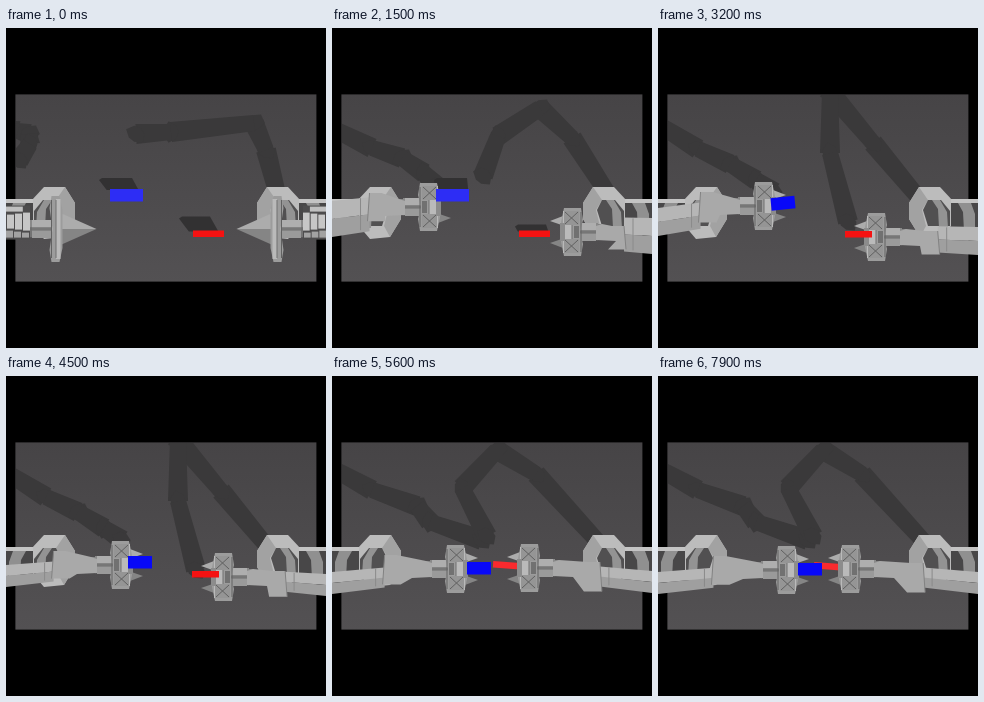
Write an HTML page with a canvas that moves like this. It is 320 px wide and 320 px high and loops after 8000 ms.

```html
<!DOCTYPE html>
<html lang="en">
<head>
<meta charset="utf-8">
<title>Two robot arms joining blocks</title>
<style>
html, body { margin: 0; width: 100%; height: 100%; overflow: hidden; background: #000; }
canvas { display: block; width: 100vw; height: 100vh; }
</style>
</head>
<body>
<canvas id="stage" width="320" height="320"></canvas>
<script>
const g = document.getElementById('stage').getContext('2d');
const LOOP = 8000, STEP = 100;
const SHADE = '#3a393a';

// The task as key points. Grippers are [x, y, forearm y], with x measured
// inwards from the arm's own side of the stage.
const HANDS = [
  { at: 0, left: [50, 201, 193], right: [49, 201, 193] },
  { at: 1500, left: [97, 179, 191], right: [80, 204, 208] },
  { at: 3200, left: [106, 178, 194], right: [102, 209, 213] },
  { at: 4500, left: [115, 189, 200], right: [103, 201, 209] },
  { at: 5600, left: [124, 193, 207], right: [123, 192, 206] },
  { at: 6800, left: [129, 194, 207], right: [128, 193, 207] }
];
// Joints of the cast shadows, shoulder to fingertip, as x, y pairs.
const REST = {
  left: [0, 100, 12, 103, 23, 106, 24, 116, 13, 132],
  right: [275, 180, 260, 122, 248, 95, 165, 104, 130, 106]
};
const REACH = {
  left: [0, 100, 40, 120, 70, 130, 92, 145, 105, 158],
  right: [285, 180, 240, 110, 208, 80, 166, 108, 151, 148]
};
const GRASP = {
  left: [0, 96, 40, 121, 72, 136, 98, 152, 116, 164],
  right: [265, 175, 215, 115, 172, 64, 172, 125, 190, 194]
};
const MEET = {
  left: [0, 92, 40, 114, 85, 130, 98, 146, 150, 164],
  right: [270, 170, 204, 98, 165, 74, 130, 112, 155, 160]
};
const SHADOWS = [
  { at: 0, ...REST }, { at: 1500, ...REACH }, { at: 3000, ...GRASP },
  { at: 4500, ...GRASP }, { at: 5600, ...MEET }
];

const ramp = (t, a, b) => Math.min(1, Math.max(0, (t - a) / (b - a)));
const mix = (a, b, k) => a + (b - a) * k;

function pose(keys, side, t) {
  let i = 0;
  while (i < keys.length - 2 && t >= keys[i + 1].at) i++;
  const a = keys[i], b = keys[i + 1];
  const k = ramp(t, a.at, b.at) ** 0.8;
  return a[side].map((v, n) => mix(v, b[side][n], k));
}

function poly(color, ...p) {
  g.beginPath();
  for (let i = 0; i < p.length; i += 2) g.lineTo(p[i], p[i + 1]);
  g.closePath();
  g.fillStyle = color;
  g.fill();
}

function box(color, x0, y0, x1, y1) {
  g.fillStyle = color;
  g.fillRect(x0, y0, x1 - x0, y1 - y0);
}

function line(color, x0, y0, x1, y1) {
  g.beginPath();
  g.moveTo(x0, y0);
  g.lineTo(x1, y1);
  g.strokeStyle = color;
  g.lineWidth = 1;
  g.stroke();
}

function armShadow(p) {
  g.strokeStyle = SHADE;
  g.lineJoin = 'bevel';
  for (let i = 0; i < p.length - 2; i += 2) {
    const [x0, y0, x1, y1] = p.slice(i, i + 4);
    const d = Math.hypot(x1 - x0, y1 - y0) || 1;
    const nx = (y0 - y1) / d, ny = (x1 - x0) / d;
    poly(SHADE, x0 + nx * 8, y0 + ny * 8, x1 + nx * 10, y1 + ny * 10,
      x1 - nx * 10, y1 - ny * 10, x0 - nx * 8, y0 - ny * 8);
    // angular joint
    const corners = [];
    for (let a = 0; a < 7; a++) {
      const r = 9 + 2 * Math.sin(a * 2 + i);
      corners.push(x1 + r * Math.cos(a * 0.9), y1 + r * Math.sin(a * 0.9));
    }
    poly(SHADE, ...corners);
  }
}

function blockShadow({ x, y, w, h }, dx, dy) {
  if (dy > -0.5) return;
  poly('#323132', x + dx, y + dy + 2, x + dx + 3, y + dy, x + w + dx, y + dy,
    x + w + dx * 0.4, y + 1, x + dx * 0.3, y + 1);
}

function block({ x, y, w, h, tilt }, color) {
  g.save();
  g.translate(x + w / 2, y + h / 2);
  g.rotate(tilt * Math.PI / 180);
  box(color, -w / 2, -h / 2, w / 2, h / 2);
  g.restore();
}

function mount() {
  poly('#bcbcbc', 38, 159, 59, 159, 69, 175, 69, 191, 58, 209, 38, 211, 27, 198, 25, 173);
  poly('#a2a2a2', 59, 159, 69, 175, 69, 191, 58, 209, 52, 198, 56, 182, 50, 172);
  poly('#515051', 28, 198, 28, 183, 37, 172, 50, 172, 55, 182, 50, 198);
  poly('#939393', 38, 172, 46, 172, 40, 181, 39, 200, 30, 200, 31, 184);
  box('#484748', 0, 175, 27, 202);
  poly('#909090', 7, 175, 20, 175, 15, 184, 14, 203, 3, 203, 3, 186);
  box('#c4c4c4', 0, 171, 27, 175);
}

function wrist(x0, x1, y) {
  box('#838383', x0, y - 8, x1, y + 8);
  box('#aeaeae', x0 + 4, y - 9, x1, y - 2);
  box('#9a9a9a', x0 + 6, y + 2, x1, y + 9);
  line('#646464', x0 + 5, y - 9, x0 + 5, y + 9);
  line('#6a6a6a', x0, y, x1, y);
}

// bend is the side on which the elbow bulges: -1 up, 1 down
function forearm(ex, y, ey, half, bend) {
  const kx = ex * 0.56, ky = mix(y, ey, 0.4);
  poly('#b6b6b6', 0, y - half, kx, ky - half + 1, kx, ky, 0, y);
  poly('#9f9f9f', 0, y, kx, ky, kx, ky + half - 1, 0, y + half);
  const top = bend < 0 ? ey - 14 : ey - 6, low = bend < 0 ? ky + 7 : ky + 15;
  poly('#a9a9a9', kx, top, kx + 12, top, ex, ey - 8, ex + 6, ey - 6,
    ex + 6, ey + 8, ex - 14, ey + 9, kx + 16, low, kx - 2, low);
  line('#828282', kx, top, kx - 2, low);
  line('#8a8a8a', kx - 9, ky - half + 2, kx - 9, ky + half - 2);
}

// boxy joints that show while the arm is folded
function joints(ex, y) {
  box('#4d4c4d', 0, y - 17, ex, y + 17);
  for (let i = 0; i < 3; i++) {
    const x = i * ex / 3;
    box('#c6c6c6', x + 1, y - 8 - i, x + ex / 3, y + 6 + i);
    box('#a2a2a2', x, y + 8 + i, x + ex / 3 - 1, y + 15);
  }
  box('#c0c0c0', 0, y - 16, ex * 0.7, y - 11);
}

function gripper(x, y, folded) {
  const w = mix(11, 6.5, folded), h = mix(24, 33, folded);
  const x0 = x - w, x1 = x + w, top = y - h, low = y + h;

  const reach = x1 + mix(11, 34, folded), gap = 11 * (1 - folded);
  poly('#acacac', x1 - 2, y - 16, x1 - 2, y - gap * 0.6, reach, y - gap);
  poly('#858585', x1 - 2, y + 16, x1 - 2, y + gap * 0.6, reach, y + gap);

  poly('#9c9c9c', x0 + 2, top, x1 - 3, top, x1, top + 14, x1, low - 14, x1 - 3, low,
    x0 + 2, low, x0, low - 12, x0 + 3, y, x0, top + 12);
  box('#bababa', x, top + 3, x1 - 2, low - 3);
  line('#626262', x0 + 2, top + 4, x0 + 2, low - 4);
  line('#707070', x, top + 4, x, low - 4);
  if (folded) return;
  for (const cy of [top + 10, low - 10]) {
    box('#959595', x0 + 4, cy - 7, x1 - 3, cy + 7);
    line('#606060', x0 + 5, cy - 6, x1 - 4, cy + 6);
    line('#606060', x0 + 5, cy + 6, x1 - 4, cy - 6);
  }
  box('#717171', x0 + 4, y - 6, x0 + 9, y + 6);
  box('#8c8c8c', x1 - 4, y - 9, x1 + 1, y + 9);
}

function arm([x, y, base], t, bend) {
  const folded = 1 - ramp(t, 0, 1500);
  const ex = x - 30;
  mount();
  wrist(ex, x - 4, y);
  if (folded > 0.3) joints(ex + 4, mix(base, y, 0.2));
  else forearm(ex, base, y, mix(18, 11, ramp(t, 1500, 4500)), bend);
  gripper(x, y, folded);
}

function mirrored(draw) {
  g.save();
  g.translate(320, 0);
  g.scale(-1, 1);
  draw();
  g.restore();
}

const floor = g.createLinearGradient(0, 66, 0, 254);
floor.addColorStop(0, '#464446');
floor.addColorStop(1, '#535153');

function render(t) {
  const left = pose(HANDS, 'left', t), right = pose(HANDS, 'right', t);
  const rx = 320 - right[0];
  const held = ramp(t, 1500, 3200), meet = ramp(t, 4500, 5600);
  const folded = 1 - ramp(t, 0, 1500);

  // blocks lie still, then follow the hand that holds them
  const blue = {
    x: mix(104, left[0] + 7 + 4 * meet, held), y: mix(161, left[1] - 9 + 2 * meet, held),
    w: mix(33, 24, held), h: 12.5, tilt: -6 * Math.sin(Math.PI * ramp(t, 1500, 4500))
  };
  const red = {
    x: mix(187, rx - 31 - 5 * meet, held), y: mix(202.5, right[1] - 6, held),
    w: mix(31, 27, held), h: 6.5, tilt: 4 * meet
  };

  box('#000', 0, 0, 320, 320);
  box(floor, 9.4, 66.4, 310.4, 253.6);

  g.save();
  g.beginPath();
  g.rect(10, 67, 300, 186);
  g.clip();
  armShadow(pose(SHADOWS, 'left', t));
  armShadow(pose(SHADOWS, 'right', t));
  blockShadow(blue, -2 - 9 * folded, -11 * (1 - held));
  blockShadow(red, -4 - 10 * folded ** 2, (-6 - 8 * folded ** 2) * (1 - held));
  g.restore();

  const drawRed = () => block(red, meet ? '#f92a2e' : '#f51212');
  if (meet) drawRed();
  arm(left, t, -1);
  mirrored(() => arm(right, t, 1));
  if (!meet) drawRed();
  block(blue, held < 0.5 ? '#2d2df5' : '#0808f8');
}

const start = performance.now();
function tick(now) {
  const t = Math.max(0, now - start) % LOOP;
  render(Math.floor(t / STEP) * STEP);
  requestAnimationFrame(tick);
}
render(0);
requestAnimationFrame(tick);
</script>
</body>
</html>
```
